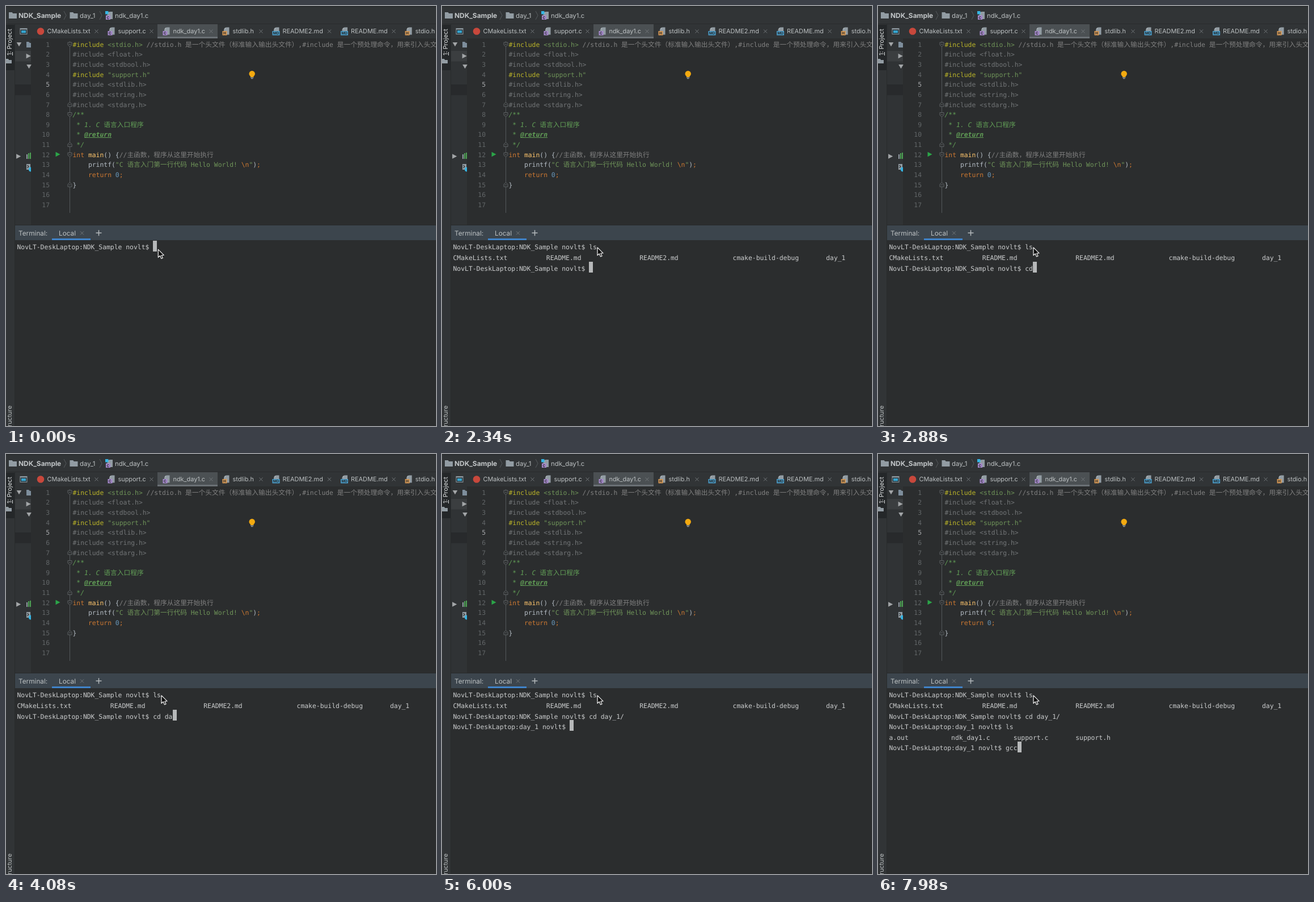
An HTML page with a canvas for the animation above (8000 ms loop, 758x739 px).

```html
<!DOCTYPE html>
<html lang="zh">
<head>
<meta charset="utf-8">
<title>Terminal session</title>
<style>
html, body { margin: 0; width: 100%; height: 100%; overflow: hidden; background: #2b2d2e; }
canvas { display: block; width: 758px; height: 739px; }
</style>
</head>
<body>
<canvas id="stage"></canvas>
<script>
const W = 758, H = 739, LOOP = 8000;
const MONO = '"DejaVu Sans Mono", monospace';
const UI = 'Inter, Roboto, sans-serif';
const CJK = '"Noto Sans CJK SC", "Noto Sans CJK", sans-serif';
const CELL = 6.857, SIZE = 11.39;

const canvas = document.getElementById('stage');
const dpr = window.devicePixelRatio || 1;
canvas.width = W * dpr;
canvas.height = H * dpr;
const c = canvas.getContext('2d');
c.scale(dpr, dpr);
c.textRendering = 'geometricPrecision';

function box(x, y, w, h, color) {
  c.fillStyle = color;
  c.fillRect(x, y, w, h);
}

function poly(points, color) {
  c.beginPath();
  points.forEach(([x, y]) => c.lineTo(x, y));
  c.closePath();
  c.fillStyle = color;
  c.fill();
}

function line(points, color, width = 1) {
  c.beginPath();
  points.forEach(([x, y], i) => i ? c.lineTo(x, y) : c.moveTo(x, y));
  c.strokeStyle = color;
  c.lineWidth = width;
  c.stroke();
}

function dot(x, y, r, color) {
  c.beginPath();
  c.arc(x, y, r, 0, Math.PI * 2);
  c.fillStyle = color;
  c.fill();
}

function text(s, x, y, font, color) {
  c.font = font;
  c.fillStyle = color;
  c.fillText(s, x, y);
  return x + c.measureText(s).width;
}

// Monospaced text with slightly wider Chinese runs
function code(s, x, y, color, style = '') {
  for (const run of s.match(/[\u3000-\uffef]+|[^\u3000-\uffef]+/g) || []) {
    const font = run.charCodeAt(0) >= 0x3000
      ? `11.72px ${CJK}`
      : `${style} ${SIZE}px ${MONO}`;
    x = text(run, x, y, font, color);
  }
  return x;
}

function triangle(x, y, r, dir, color) {
  poly(dir === 'down'
    ? [[x - r, y - r * .8], [x + r, y - r * .8], [x, y + r * .9]]
    : [[x - r * .9, y - r], [x + r, y], [x - r * .9, y + r]], color);
}

function cross(x, y) {
  line([[x - 3, y - 3], [x + 3, y + 3]], '#72777a');
  line([[x + 3, y - 3], [x - 3, y + 3]], '#72777a');
}

function folder(x, y, w = 14, h = 11) {
  poly([[x, y], [x + w * .4, y], [x + w * .52, y + 2], [x + w, y + 2],
        [x + w, y + h], [x, y + h]], '#929ca3');
}

function fileIcon(x, y, label, color) {
  poly([[x + 6.5, y], [x + 12, y], [x + 12, y + 13], [x + 2.5, y + 13],
        [x + 2.5, y + 4]], '#929ca3');
  poly([[x + 5.5, y], [x + 5.5, y + 3.2], [x + 2.5, y + 3.2]], '#b0b8bd');
  const w = label.length > 1 ? 13 : 8;
  box(x, y + 6.5, w, 7.5, color);
  c.textAlign = 'center';
  text(label, x + w / 2, y + 12.8, `bold 6.5px ${UI}`, '#25282a');
  c.textAlign = 'left';
}

const FILE = {
  c: ['C', '#a98bd0'],
  h: ['H', '#d99a55'],
  md: ['MD', '#4ba0ce']
};

function topBars() {
  box(0, 0, W, 57, '#313436');
  box(0, 0, W, 2, '#292c2e');
  box(0, 31, W, 1, '#292b2d');

  folder(5, 11);
  text('NDK_Sample', 22, 20.5, `bold 11.9px ${UI}`, '#c3c7c9');
  line([[102, 9], [106, 16.5], [102, 24]], '#565b5e');
  folder(112.5, 11);
  text('day_1', 130, 20.5, `11.4px ${UI}`, '#bcc0c2');
  line([[165, 9], [169, 16.5], [165, 24]], '#565b5e');
  fileIcon(176, 10, ...FILE.c);
  box(175, 9, 5.5, 5.5, '#35b5e4');
  text('ndk_day1.c', 192, 20.5, `11.4px ${UI}`, '#bcc0c2');

  box(267, 32, 106, 25, '#4b5053');
  box(267, 54, 106, 3, '#6a7075');
  dot(61, 44.5, 6.3, '#c8483c');
  const tabs = [
    ['CMakeLists.txt', 72.5, 159.5],
    ['support.c', 197.5, 256.5],
    ['ndk_day1.c', 294.5, 361.5],
    ['stdlib.h', 399.5, 449.5],
    ['README2.md', 487.5, 570],
    ['README.md', 608, 683.5],
    ['stdio.h', 721.5, 790]
  ];
  for (const [name, x, end] of tabs) {
    const type = FILE[name.split('.')[1]];
    if (type) fileIcon(x - 18, 37.5, ...type);
    text(name, x, 48.3, `10.9px ${UI}`, '#bcc0c2');
    cross(end, 44.5);
  }
}

function sidePanels() {
  box(0, 32, 15, H - 32, '#313436');
  box(0, 33, 15, 80, '#242729');
  box(15, 32, 1, H - 32, '#282b2c');
  const upright = (s, y, color) => {
    c.save();
    c.translate(9.5, y);
    c.rotate(-Math.PI / 2);
    text(s, 0, 0, `10.9px ${UI}`, color);
    c.restore();
  };
  upright('1: Project', 87, '#dcdfe0');
  box(11, 81, 1, 6, '#dcdfe0');
  upright('Structure', 750.5, '#bcc0c2');
  folder(0, 93, 10, 8);

  box(16, 57, 28, 329, '#303335');
  box(16, 79, 28, 18.5, '#3b3e40');
  box(16, 138, 28, 19, '#282a2c');
  box(24.5, 39, 13, 11, '#8d979e');
  box(25.5, 41.5, 11, 7.5, '#27343b');
  box(27, 43, 8, 4.5, '#36a5cf');

  const gray = '#a2a5a7';
  triangle(23, 67.5, 4.3, 'down', gray);
  poly([[36, 63], [40, 63], [42, 65], [44, 65], [44, 73], [36, 73]], '#7e8e9c');
  triangle(39.5, 88, 4.3, 'right', gray);
  triangle(40.5, 106.5, 4.3, 'down', gray);
  triangle(22, 264.5, 4.3, 'right', gray);
  box(36, 261, 2, 8, '#929ca3');
  box(39, 259, 2, 10, '#4fa455');
  box(42, 258, 2, 11, '#4fa455');
  box(36, 278, 7, 10, '#929ca3');
  line([[37.5, 280], [40, 282.5], [37.5, 285]], '#303335', 1.2);
  c.save();
  c.beginPath();
  c.rect(36, 276, 8, 18);
  c.clip();
  dot(44, 287.5, 4, '#35b5e4');
  c.restore();
}

const C = {
  dir: '#bbb529', dim: '#727577', str: '#6f9459', note: '#808080', doc: '#629f57',
  key: '#cc7832', fn: '#ffc66d', plain: '#b4bcc4', num: '#6897bb'
};

const dimInclude = name => [[`#include <${name}.h>`, C.dim]];
const SOURCE = [
  [['#include ', C.dir], ['<stdio.h>', C.str],
   [' //stdio.h 是一个头文件（标准输入输出头文件）,#include 是一个预处理命令，用来引入头文件', C.note]],
  dimInclude('float'),
  dimInclude('stdbool'),
  [['#include ', C.dir], ['"support.h"', C.str]],
  dimInclude('stdlib'),
  dimInclude('string'),
  dimInclude('stdarg'),
  [['/**', C.doc, 'italic']],
  [[' * 1. C 语言入口程序', C.doc, 'italic']],
  [[' * ', C.doc, 'italic'], ['@return', C.doc, 'italic bold']],
  [[' */', C.doc, 'italic']],
  [['int ', C.key], ['main', C.fn], ['() {', C.plain], ['//主函数，程序从这里开始执行', C.note]],
  [['    printf(', C.plain], ['"C 语言入门第一行代码 Hello World! ', C.str],
   ['\\n', C.key], ['"', C.str], [')', C.plain], [';', C.key]],
  [['    return ', C.key], ['0', C.num], [';', C.key]],
  [['}', C.plain]],
  [],
  []
];

function foldMark(y, closing) {
  const s = closing ? -1 : 1;
  const p = [[109, y - 3.5 * s], [116, y - 3.5 * s], [116, y + s], [112.5, y + 4 * s],
             [109, y + s], [109, y - 3.5 * s]];
  poly(p, '#2b2d2e');
  line(p, '#65696b', .9);
  line([[110.8, y], [114.2, y]], '#65696b', .9);
}

function editor() {
  box(44, 57, W - 44, 329, '#2b2d2e');
  line([[112.5, 62], [112.5, 364]], '#54585a');
  SOURCE.forEach((parts, i) => {
    const y = 71.6 + i * 17.65;
    c.textAlign = 'right';
    text(i + 1, 77, y, `${SIZE}px ${MONO}`, i === 4 ? '#a8abad' : '#626668');
    c.textAlign = 'left';
    let x = 117.5;
    for (const [s, color, style] of parts) {
      const start = x;
      x = code(s, x, y, color, style);
      if (s === '@return') box(start, Math.round(y + .5), x - start, 1, color);
    }
  });
  [[0], [6, true], [7], [10, true], [11], [14, true]]
    .forEach(([row, closing]) => foldMark(67.5 + row * 17.65, closing));
  triangle(91.3, 261, 4.2, 'right', '#2ba548');
  dot(433.7, 119.2, 5.2, '#f4aa10');
  box(431, 122, 5.4, 3, '#f4aa10');
  box(431, 125.4, 5.4, 1.1, '#a8adb0');
  box(432, 127.2, 3.4, 1, '#a8adb0');
}

function terminalFrame() {
  box(16, 386, W - 16, 353, '#2b2d2e');
  box(16, 386, W - 16, 26, '#3c454d');
  box(16, 385, W - 16, 1, '#282a2b');
  text('Terminal:', 22, 403.5, `11.8px ${UI}`, '#bcc0c2');
  text('Local', 93, 403.5, `11.8px ${UI}`, '#bcc0c2');
  cross(134, 399.5);
  line([[158.5, 399.3], [168.5, 399.3]], '#b5babd', 1.5);
  line([[163.5, 394.3], [163.5, 404.3]], '#b5babd', 1.5);
  box(81, 409, 68, 3, '#4083c9');
}

const HOME = 'NovLT-DeskLaptop:NDK_Sample novlt$ ';
const DAY = 'NovLT-DeskLaptop:day_1 novlt$ ';
const columns = (names, width) => names.map(s => s.padEnd(width)).join('').trimEnd();
const LIST_HOME = columns(['CMakeLists.txt', 'README.md', 'README2.md', 'cmake-build-debug', 'day_1'], 24);
const LIST_DAY = columns(['a.out', 'ndk_day1.c', 'support.c', 'support.h'], 16);
const BLINKS = [[1860, 2340], [3840, 3960], [5520, 6000], [7740, 7860]];

// Latest text whose time has come
const typed = (t, keys) => keys.reduce((s, [at, value]) => t >= at ? value : s, '');

function screenRows(t) {
  const rows = [HOME + typed(t, [[780, 'l'], [900, 'ls']])];
  if (t >= 1440) {
    rows.push(LIST_HOME, HOME + typed(t, [
      [2820, 'cd'], [2940, 'cd '], [3960, 'cd d'], [4080, 'cd da'], [4260, 'cd day_1/']]));
  } else if (t >= 1380) rows.push('');
  if (t >= 4620) rows.push(DAY + typed(t, [[6120, 'l'], [6240, 'ls']]));
  if (t >= 6360) {
    rows.push(LIST_DAY, DAY + typed(t, [[6840, 'g'], [7860, 'gc'], [7980, 'gcc']]));
  } else if (t >= 6300) rows.push('');
  return rows;
}

function shell(t) {
  const rows = screenRows(t), last = rows.length - 1;
  rows.forEach((s, i) => code(s, 19.5, 428.2 + i * 18.65, '#cbcdce'));
  if (!BLINKS.some(([from, to]) => t >= from && t < to)) {
    const x = Math.round(19.5 + rows[last].length * CELL);
    box(x, Math.round(412.5 + last * 18.65), 7, 19, '#b6b8b9');
  }
}

function inputPopup(t) {
  if (t < 2400 || t >= 2820) return;
  c.save();
  c.shadowColor = 'rgba(0,0,0,.6)';
  c.shadowBlur = 4;
  c.shadowOffsetY = 1;
  box(263, 472, 311, 53, '#000');
  c.restore();
  const end = text(t < 2640 ? 'c' : "c'd", 275, 490, `15.5px ${CJK}`, '#c9d5e2');
  box(end + .5, 476, 1, 18, '#dfe4e8');
  ['传递', '成都', '长度', '存档', 'CD'].forEach((word, i) =>
    text(`${i + 1}.${word}`, 276 + i * 56.2 - (i === 1 ? 1.5 : 0), 515.5,
      `15.3px ${CJK}`, i ? '#f0f0f0' : '#bccbdd'));
  line([[553, 510.5], [549, 514], [553, 517.5]], '#8c8c8c', 1.8);
  line([[560, 510.5], [564.5, 514], [560, 517.5]], '#f0f0f0', 1.8);
}

function pointer(t) {
  const k = Math.min(3, Math.floor(t / 60)) / 3;
  c.save();
  c.translate(268.3 + 5.7 * k, 428.3 - 3.5 * k);
  const shape = [[0, 0], [0, 14], [3.3, 11], [5.5, 16.2], [8, 15.2], [5.8, 10.2], [10, 10]];
  c.lineJoin = 'round';
  poly(shape, '#0c0c0c');
  line([...shape, shape[0], shape[1]], '#f4f4f4', 1.2);
  c.restore();
}

function draw(t) {
  box(0, 0, W, H, '#2b2d2e');
  topBars();
  editor();
  sidePanels();
  terminalFrame();
  shell(t);
  inputPopup(t);
  pointer(t);
}

const begin = performance.now();
function tick() {
  draw((performance.now() - begin) % LOOP);
  requestAnimationFrame(tick);
}
tick();
</script>
</body>
</html>
```
